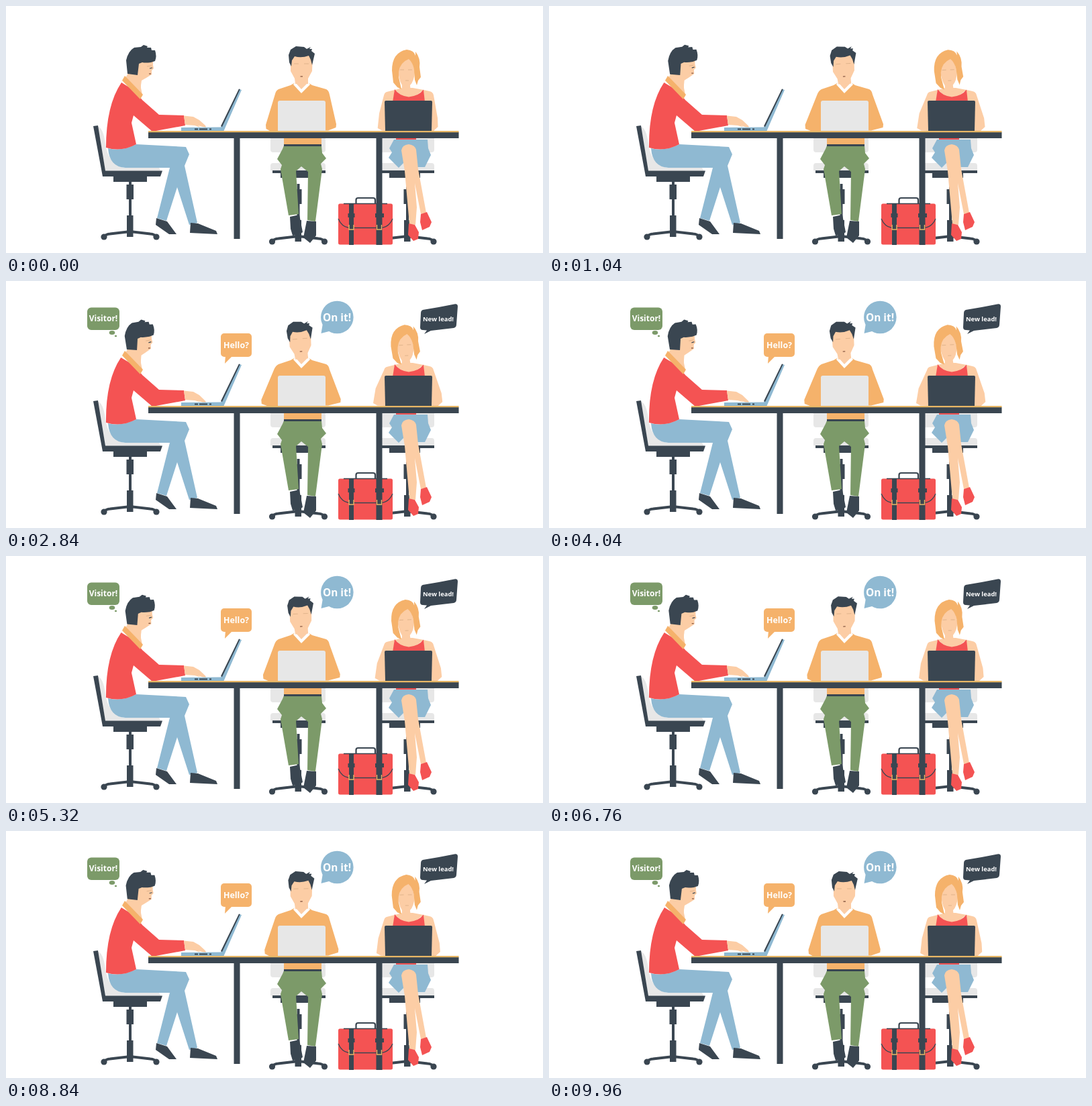
An HTML page that plays this animation: 800 by 368 pixels, repeating every 10 s.

```html
<!DOCTYPE html>
<html lang="en">
<head>
<meta charset="utf-8">
<title>Office chat</title>
<style>
html, body { margin: 0; width: 100%; height: 100%; overflow: hidden; background: #fff; }
svg { display: block; width: 100%; height: 100%; }
text { font-family: "Open Sans", "Noto Sans", sans-serif; font-weight: 700; fill: #fff; text-anchor: middle; }
.d { fill: #3a4651; } .r { fill: #f45353; } .s { fill: #fccda5; } .o { fill: #f5b26b; }
.b { fill: #8fb9d2; } .g { fill: #7c9a69; } .l { fill: #e7e7e7; } .w { fill: #fff; }
.line { fill: none; stroke: #3a4651; }
.face { fill: none; stroke: #e0b48c; stroke-width: 1; }
.mouth { fill: none; stroke: #8a5a44; stroke-width: 1.3; }
</style>
</head>
<body>
<svg viewBox="0 0 800 368">
<defs>
  <g id="stand" class="d">
    <path d="M183 258h4v80h-4zM179.500 266h10.500v22h-10.500zM180 312h9.500v32h-9.500z"/>
    <path class="line" stroke-width="4" d="M147 343Q149 340 155 339.500L185 336L215 339.500Q221 340 223 343"/>
    <circle cx="146" cy="344" r="4.600"/><circle cx="224" cy="344" r="4.600"/>
  </g>
  <g id="seat">
    <path class="l" d="M394 197h82v17q0 4-4 4h-74q-4 0-4-4zM398 234h74q4 0 4 4v7h-82v-7q0-4 4-4z"/>
    <path class="d" d="M397 245h79v4h-21v7h-46v-7h-12z"/>
  </g>
</defs>

<!-- left man -->
<use href="#stand"/>
<path class="l" d="M137 180Q145 182 148 205Q152 235 175 241H228L231 246H148z"/>
<path class="d" d="M130 179L137 178L148 245.500H233L230 254H144zM160 254h50v8h-50z"/>
<path class="b" d="M152 212Q172 217 194 206L268 210L273 221L266 238L285 323L273 326L255 270L239 320L225 316L244 241H178Q154 240 152 212z"/>
<path class="d" d="M224 316L240 321L254 340H243L223 326zM275 323L286 324L313 335L315 340L274 338z"/>
<path class="s" d="M182 100H201V122L203 132L178 107z"/>
<g id="headA">
  <path class="s" d="M195 84L219 82L219 88L220 93L217 96L217 102L209 107L202 111L201 118L188 106z"/>
  <path class="d" d="M181 101L179 81Q182 67 191 62L201 61L205 58L211 60L210 62L216 62L217 66L222 66Q225 75 222 82L216 84Q207 85 203 84L198 86L196 103z"/>
  <path class="face" d="M210 90L217 89"/><path class="line" stroke-width="1.200" d="M214 93L218 92"/>
  <path class="mouth" d="M213 101L216 101"/>
</g>
<path id="sweater" class="r"/>
<path class="o" d="M177 104L204 132L200 139L173 111z"/>
<path id="hand" class="s"/>

<!-- middle man -->
<use href="#stand" x="250.500" y="7"/>
<use href="#seat"/>
<path class="g" d="M414 208H470L471 219L477 227L469 235L471 243L461 321L449 319L450 247L440 239L432 246L436 310L421 312L409 243L411 237L404 228L412 213z"/>
<path class="d" d="M414 205H470V209H414zM423 314L437 311L442 337L436 341L427 342L424 332zM448 320L462 321L462 342L453 353L443 345z"/>
<path id="bodyB" class="o"/>
<path class="w" d="M428 117L431 113H450L453 117L440 130z"/>
<path class="s" d="M431 112H450L450 114L440 124L431 114z"/>
<g id="headB">
  <path class="s" d="M424 72H457L456 97L450 108V116H431L430 108L424 97z"/>
  <path class="d" d="M421 73L424 65L432 60L444 61L448 64L454 61L452 64L456 64L455 67L460 71L456 88L454 80L451 74Q440 78 430 75L426 81L425 90L422 84z"/>
  <path class="face" d="M429 86H436M444 86H451"/><path class="mouth" d="M438.500 105H442"/>
</g>

<!-- woman -->
<use href="#stand" x="413" y="7"/>
<use href="#seat" x="162"/>
<path class="r" d="M581 196H611V202H581z"/>
<path class="b" d="M578 199H628L629 212L633 222L624 240L611 240L608 212L592 214L594 232L585 241L570 226L575 218L571 212z"/>
<path class="s" d="M589 215Q590 207 600 206Q609 207 611 214L614 243L626 308L618 310L609 264L612 300L610 326L601 325L594 246z"/>
<g id="armsWrap"><path id="armsC" class="s"/></g>
<path class="r" d="M600 324L609 326L615 337L614 347L607 350L599 341zM618 310L627 307L634 322L631 329L620 334L617 322z"/>
<path class="s" d="M579 125L591 122H606L622 125L600 142z"/>
<path class="r" d="M579 124Q586 134 600 135.500Q615 134 622 124.500L624 143H576z"/>
<g id="headC">
  <path class="s" d="M584 90Q590 74 604 78L609 98Q608 112 602 118L603 128H590V118Q584 108 584 90z"/>
  <path class="o" d="M575 96Q575 69 597 65Q608 66 610 74L610 68Q618 78 616 91L618 106L614 111L612 118L609 110L608 95Q606 84 600 79Q587 84 585 98L585 106L589 124L583 121L577 114z"/>
  <path class="face" d="M587 95H593M599 95H605"/><path class="face" d="M595 111H600"/>
</g>

<!-- table, laptops, bag -->
<path class="d" d="M339.500 196h9v151h-9zM212 188H674.500V197H212z"/>
<path fill="#e8b765" d="M212 186H674.500V188.300H212z"/>
<path class="b" d="M261 181L320 180.500L347 124L351 125L324.500 186H261z"/>
<path class="d" d="M320 179L347 123.500L348.800 124L322 180zM281 182.500h5v2h-5zM288 182.500h12v2h-12zM303 182.500h3v2h-3z"/>
<path class="l" d="M408 141H473Q476 141 476 144V186H405V144Q405 141 408 141z"/>
<path class="d" d="M566 141H633Q635 141 635 143L634 186H565L564 143Q564 141 566 141z"/>
<rect class="r" x="495" y="294.500" width="81" height="61" rx="2.500"/>
<path class="line" stroke-width="2.200" d="M521.500 295V289Q521.500 286 524.500 286H547Q550 286 550 289V295"/>
<path class="line" stroke-width="1.300" d="M495 317Q501 330.500 513 330.500H557Q570 330.500 576 317M503 294.500H568"/>
<path class="d" d="M551.500 196H560.500V356H551.500zM511 294H518V356H511zM509.500 309H519.500V315H509.500zM550 309H563V315H550z"/>
<path fill="none" stroke="#e8b765" stroke-width="1.400" d="M511 326V333H518V326M552.500 326V333H559.500V326"/>

<!-- bubbles -->
<g class="bubble g"><rect x="121" y="39.500" width="48" height="33.500" rx="6"/><ellipse cx="158" cy="77" rx="4.300" ry="3"/><ellipse cx="163.500" cy="82" rx="1.700" ry="1.200"/></g>
<g class="bubble o"><rect x="320" y="78" width="46" height="35" rx="5"/><path d="M327 111L326 123L338 111z"/></g>
<g class="bubble b"><circle cx="493.300" cy="54" r="24.300"/><path d="M472 63L469.500 78L485 74z"/></g>
<g class="bubble d"><path d="M621 43Q646 39 668 34.500Q673 33.500 673 38L671 65Q671 69 667 70L633 74L623 79L627 73.500L621 73Q617 73 617 69L618 48Q618 44 621 43z"/></g>
<text class="label" x="145" y="60" font-size="12">Visitor!</text>
<text class="label" x="343" y="99.500" font-size="12.400">Hello?</text>
<text class="label" x="493" y="60" font-size="15.400">On it!</text>
<text class="label" x="644" y="60" font-size="9.400">New lead!</text>
</svg>
<script>
const LOOP = 10000, STEP = 40, SWAY = 625;
const $ = id => document.getElementById(id);
const bubbles = [...document.querySelectorAll(".bubble")];
const labels = [...document.querySelectorAll(".label")];
// bubble start time, tail point, label pivot
const chats = [
  [1130, 165, 83, 155, 69], [1333, 326, 123, 334, 109],
  [1521, 470, 78, 482, 67], [1729, 621, 79, 634, 68]
];

const clamp = v => Math.max(0, Math.min(1, v));
const spring = u => {
  if (u <= 0) return 0;
  const a = u * 0.0122;
  return 1 - Math.exp(-a / 1.8) * Math.cos(a);
};
const zoom = (el, x, y, s, deg = 0) => {
  el.setAttribute("transform", `translate(${x} ${y}) rotate(${deg}) scale(${s}) translate(${-x} ${-y})`);
  el.style.display = s > 0 ? "" : "none";
};
const turn = (id, deg, x, y) => $(id).setAttribute("transform", `rotate(${deg} ${x} ${y})`);
const path = (id, d) => $(id).setAttribute("d", d);

function people(t) {
  const half = t % 5000;
  const w = Math.abs(Math.sin(Math.PI * half / SWAY));
  const amp = half < SWAY ? 0.6 : 1;
  const nod = w * w * amp;
  const L = 6.8 * amp * w ** 1.6;
  const R = 6.8 * Math.min(1, amp + 0.25) * w ** 0.85;

  turn("headA", -3.6 * nod, 196, 118);
  turn("headB", -4.4 * nod, 440, 115);
  turn("headC", -3.4 * nod, 599, 124);

  const k = 0.8 * nod;
  path("sweater", `M${172 - k} 114Q${149 - k} 148 149 211Q172 218 194 206L187 174L190 163L218 187L267 178L265 163L228 162L203 140L193 127z`);
  path("hand", `M265 163.500L279 165L288 170L297 ${178 + k}L298 181L293 ${180 + k}L286 178L290 ${181 - k}L281 178L267 177z`);
  path("bodyB", `M406 124L424 118L431 114L440 128L450 114L456 118L477 124Q481 126 482 132L${492 + R} 176L${491.5 + R} 181L480 185.500H470V206H414V186H${393 - L * 0.6}L${387.5 - L} 183L${387 - L} 177L${401 - L * 0.2} 131Q402 126 406 124z`);
  path("armsC", `M567 128L579 125L577 142H566V186L${560 - L} 185.500L${553.7 - L} 182L${556 - L * 0.8} 160L563 133Q564 129 567 128zM622 125L631 127Q636 128 637 133L${643 + R * 0.85} 167L${643.5 + R} 180L${637 + R} 186H634V142H623z`);
}

function chat(t) {
  chats.forEach(([start, tx, ty, px, py], i) => {
    const u = t - start, s = spring(u);
    zoom(bubbles[i], tx, ty, s, 35 * (s - 1));
    const p = clamp((u - 300) / 290);
    zoom(labels[i], px, py, 1 - (1 - p) ** 2);
  });
}

function draw(now) {
  const t = Math.floor((now % LOOP) / STEP) * STEP;
  people(t);
  chat(t);
}

let first;
function tick(now) {
  first ??= now;
  draw(now - first);
  requestAnimationFrame(tick);
}
draw(0);
requestAnimationFrame(tick);
</script>
</body>
</html>
```
